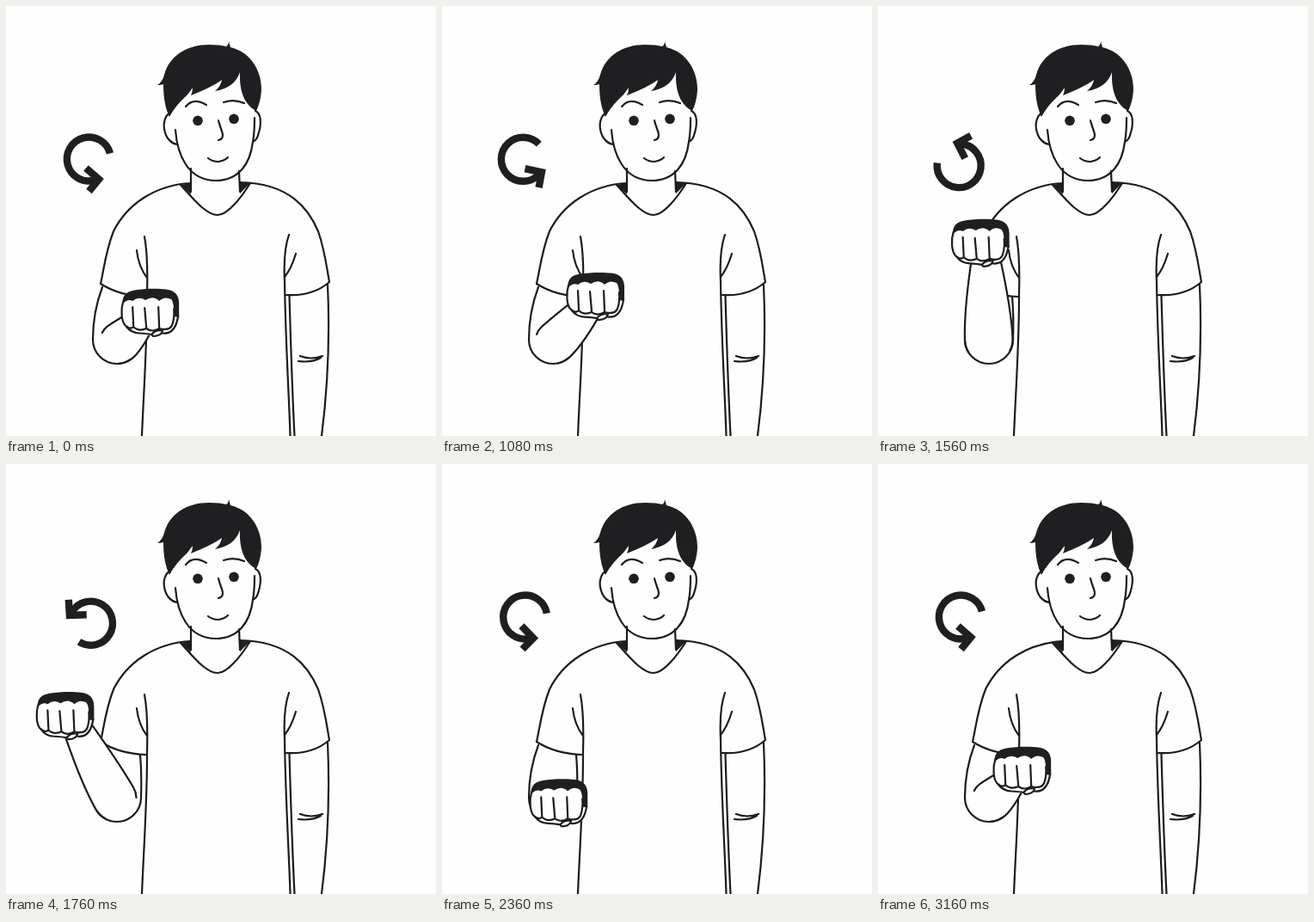
Recreate the animation shown at these times as an HTML page. Size 500 by 500 pixels, loop 4 s.

```html
<!DOCTYPE html>
<html lang="en">
<head>
<meta charset="utf-8">
<title>Circling fist</title>
<style>
  html, body { margin: 0; width: 100%; height: 100%; overflow: hidden; background: #fefefe; }
  svg { display: block; width: 100vw; height: 100vh; }
  .line { fill: none; stroke: #1c1c1f; stroke-width: 2.2; stroke-linecap: round; stroke-linejoin: round; }
  .solid { fill: #1f1f22; }
  .skin { fill: #fefefe; }
  .thick { fill: none; stroke: #1f1f22; stroke-width: 8.4; }
</style>
</head>
<body>
<svg viewBox="0 0 500 500">
  <g id="head">
    <path class="line" d="M191 124C184 128 183 137 184 143C186 155 193 160 199 161M197 144C199 172 211 203 244 203C270 203 284 184 287 158C289 148 289 140 289 130M290 122C297 125 297 137 294 147Q292 156 287 158"/>
    <path class="line" d="M209 117Q218 106 233 115M253 112Q265 108 277 113M247 133C249 142 252 146 252 150Q252 155 247 156M235 177Q240 181 247 181Q254 180 258 176"/>
    <circle class="solid" cx="223" cy="133.3" r="5.8"/>
    <circle class="solid" cx="265" cy="131.3" r="5.8"/>
    <path class="solid" d="M190 129C185 118 183 106 183 91Q180 92 176 92Q182 88 184 80C190 58 210 45 236 45Q250 45 256 47Q259 45 259 41L261 48C285 54 297 75 297 98Q296 112 291 122C280 116 271 104 272 77Q266 95 243 99Q250 93 251 86Q240 94 215 104Q217 100 217 95Q212 103 204 110Q196 118 190 129Z"/>
  </g>
  <g id="body">
    <path class="solid" d="M203 208L215 206V219ZM272 205L284 206L272 218Z"/>
    <path class="line" d="M215 189V216M271 192L272 216M203 208C216 222 232 243 246 243C258 243 274 222 284 206"/>
    <path class="line" d="M215 206C174 208 141 230 125 262C116 285 114 305 110 323Q132 337 163 338M161 268C166 295 164 320 164 340C164 395 160 450 158 500M152 284Q154 303 164 316"/>
    <path class="line" d="M272 205C330 206 352 236 363 262C371 285 373 305 376 321Q356 338 326 336M329 266C324 280 323 300 324 320C325 390 329 450 330.500 500M337 288Q332 305 324 315"/>
    <path class="line" d="M329.500 337C331 390 333 450 335.500 500M374 324C377 390 374 445 367 500M342 407Q355 412 368 407M340 413Q356 415 366 409"/>
    <path class="line" d="M112 327C104 348 101 365 101 388A28 28 0 0 0 157 388Q158 360 156 338"/>
  </g>
  <path id="forearmFill" class="skin"/>
  <path id="forearmLine" class="line"/>
  <g id="fist">
    <path class="skin" d="M136 341C133 350 133 368 139 373C145 381 158 381 168 383C175 385 185 381 192 379C198 375 200 366 200 360V345C200 334 194 331 185 330C170 329 155 330 147 332C140 333 137 336 136 341Z"/>
    <path class="line" d="M136 344C133 353 134 366 138 371Q144 377 148 373Q154 379 163 375Q170 380 178 375Q190 378 193 371Q196 362 195 352M147 350L148 372M161 351L163 374M177 350L178 374"/>
    <path class="line" d="M140 373Q145 380 155 380.500Q164 381 169 382Q174 376 182 377.500Q180 384 171 384L169 382M182 380.500Q197 382 200 360"/>
    <path class="solid" d="M135 347C135 335 141 332 149 330.500C160 328.500 178 328.500 186 329.500C198 331 201 338 201 346V362L195 361C195 352 195 345 192 341Q184 337 178 343Q171 336 162 342Q154 337 147 343Q141 340 135 347Z"/>
  </g>
  <g id="arrow">
    <path class="thick" d="M121 171.400A25.500 25.500 0 1 0 103 202.600"/>
    <path class="thick" d="M93 188.500L108 201.500L96.500 215.500"/>
  </g>
</svg>
<script>
const LOOP = 4000, STEP = 40;
const REST = { x: 167, y: 357 };      // fist centre at rest
const ORBIT = { x: 118, y: 333 };     // centre of the fist's round
const ELBOW = { x: 129, y: 388 };
const ELBOW_R = 28, WRIST_R = 17, CREASE = Math.PI / 6;
const el = id => document.getElementById(id);
const radians = degrees => degrees * Math.PI / 180;

function easeSine(t, from, to) {
  const u = Math.min(1, Math.max(0, (t - from) / (to - from)));
  return (1 - Math.cos(Math.PI * u)) / 2;
}

// the hand draws a slightly uneven circle, anticlockwise
function fistAt(t) {
  const a = radians(360 * easeSine(t, 750, 2865) - 26);
  const r = 62 + 3 * Math.sin(2 * a) + 5 * Math.sin(3 * a);
  return { x: ORBIT.x + r * Math.cos(a), y: ORBIT.y - r * Math.sin(a) };
}

const polar = (from, angle, r) =>
  [from.x + r * Math.cos(angle), from.y + r * Math.sin(angle)];

// one edge of the forearm: side -1 is left of the elbow-to-hand direction, 1 right;
// the edge inside the bend hugs the elbow more tightly
function forearmEdge(wrist, heading, reach, side) {
  const r = ELBOW_R - 11 * Math.max(0, -side * Math.cos(heading));
  const across = heading + side * Math.PI / 2;
  const base = polar(ELBOW, across, r);
  const bend = polar({ x: base[0], y: base[1] }, heading, reach * 0.35);
  const crease = polar(ELBOW, across + side * CREASE, r);
  const end = polar(wrist, across, WRIST_R);
  return {
    base, bend, end,
    line: `M${crease}A${r} ${r} 0 0 ${side < 0 ? 1 : 0} ${base}Q${bend} ${end}`
  };
}

function drawForearm(fist) {
  const dx = fist.x + 6 - ELBOW.x, dy = fist.y - ELBOW.y;
  const heading = Math.atan2(dy, dx);
  const reach = Math.max(0, Math.hypot(dx, dy) - 20);
  const [x, y] = polar(ELBOW, heading, reach);
  const [left, right] = [-1, 1].map(side => forearmEdge({ x, y }, heading, reach, side));
  el('forearmFill').setAttribute('d',
    `M${left.base}Q${left.bend} ${left.end}L${right.end}Q${right.bend} ${right.base}Z`);
  el('forearmLine').setAttribute('d', left.line + right.line);
}

function draw(t) {
  const fist = fistAt(t);
  drawForearm(fist);
  el('fist').setAttribute('transform', `translate(${fist.x - REST.x} ${fist.y - REST.y})`);
  el('arrow').setAttribute('transform', `rotate(${-360 * easeSine(t, 765, 2490)} 96 182)`);
}

const start = performance.now();
function tick() {
  const t = (performance.now() - start) % LOOP;
  draw(Math.floor(t / STEP) * STEP);
  requestAnimationFrame(tick);
}
tick();
</script>
</body>
</html>
```
